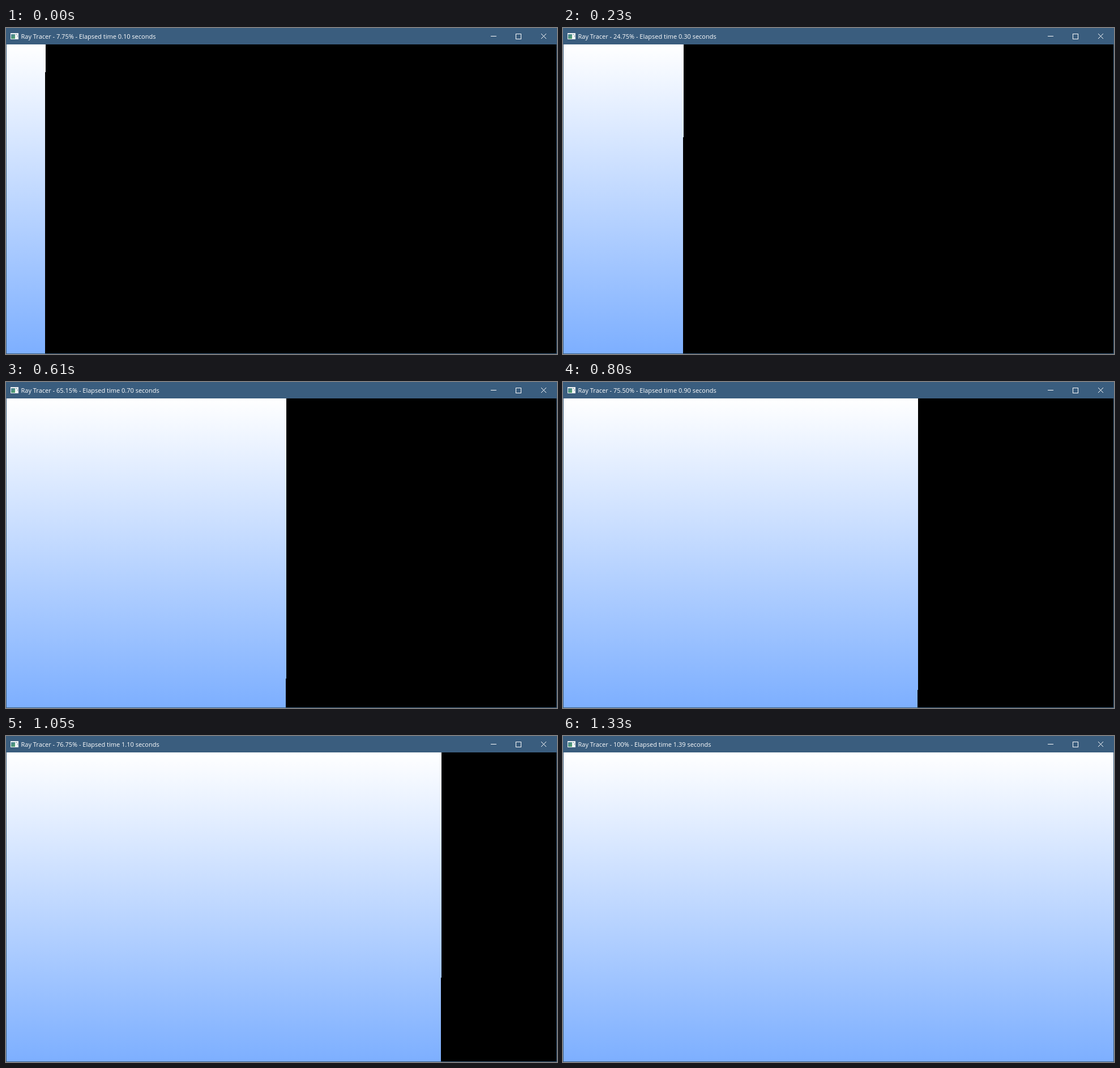
These frames come from a looping animation (973x576 px, 1570 ms). An HTML page:

```html
<!DOCTYPE html>
<html lang="en">
<head>
<meta charset="utf-8">
<title>Ray Tracer</title>
<style>
  html, body { margin: 0; width: 100%; height: 100%; overflow: hidden; background: #000; }
  svg { display: block; }
  text { font: 11px "Open Sans", "Noto Sans", sans-serif; fill: #fff; white-space: pre; }
</style>
</head>
<body>
<svg width="973" height="576" viewBox="0 0 973 576">
  <defs>
    <linearGradient id="sky" gradientUnits="userSpaceOnUse" x1="0" y1="29" x2="0" y2="575">
      <stop stop-color="#fff"/>
      <stop offset="1" stop-color="#7dafff"/>
    </linearGradient>
    <linearGradient id="pane" x2=".6" y2="1">
      <stop stop-color="#4a7d9c"/>
      <stop offset="1" stop-color="#4fa06c"/>
    </linearGradient>
  </defs>
  <rect width="973" height="576" fill="#3a5d7e"/>
  <rect x="1" y="29" width="971" height="546"/>
  <path id="render" fill="url(#sky)" shape-rendering="crispEdges"/>

  <!-- window icon -->
  <rect x="8" y="9" width="14" height="11" fill="#f2f4f5"/>
  <rect x="9" y="11" width="7" height="8" fill="url(#pane)"/>
  <path d="M17 11h3v1h-3zM20 13h1v3h-1z" fill="#8fa5b0"/>

  <text id="title" x="26.5" y="19"></text>
  <g fill="none" stroke="#fff">
    <path d="M856 14.5h10"/>
    <rect x="900.5" y="10.5" width="9" height="9"/>
    <path d="M945 10l9 9M954 10l-9 9"/>
  </g>
</svg>
<script>
const LOOP = 1570;
// start ms, current column, row reached in that column, percent, elapsed seconds
const steps = [
  [0, 69, 78, "7.75", "0.10"],
  [90, 140, 135, "7.75", "0.10"],
  [140, 140, 135, "16.25", "0.20"],
  [230, 212, 193, "24.75", "0.30"],
  [330, 282, 334, "38.75", "0.40"],
  [420, 351, 475, "52.50", "0.50"],
  [520, 423, 500, "58.75", "0.60"],
  [610, 494, 524, "65.15", "0.70"],
  [710, 560, 534, "70.25", "0.80"],
  [800, 626, 544, "75.50", "0.90"],
  [950, 697, 554, "80.50", "1.00"],
  [1050, 768, 427, "76.75", "1.10"],
  [1150, 838, 300, "73.00", "1.20"],
  [1240, 905, 438, "86.50", "1.30"],
  [1330, 972, 29, "100", "1.39"],
];
const render = document.getElementById("render");
const title = document.getElementById("title");
let shown;

function draw(now) {
  const time = now % LOOP;
  const step = steps.findLast(([start]) => start <= time);
  if (step !== shown) {
    const [, x, y, percent, elapsed] = shown = step;
    render.setAttribute("d", `M1 29H${x + 1}V${y}H${x}V575H1z`);
    title.textContent = `Ray Tracer - ${percent}% - Elapsed time ${elapsed} seconds`;
  }
}

const origin = performance.now();
function tick() {
  draw(performance.now() - origin);
  requestAnimationFrame(tick);
}
tick();
</script>
</body>
</html>
```
